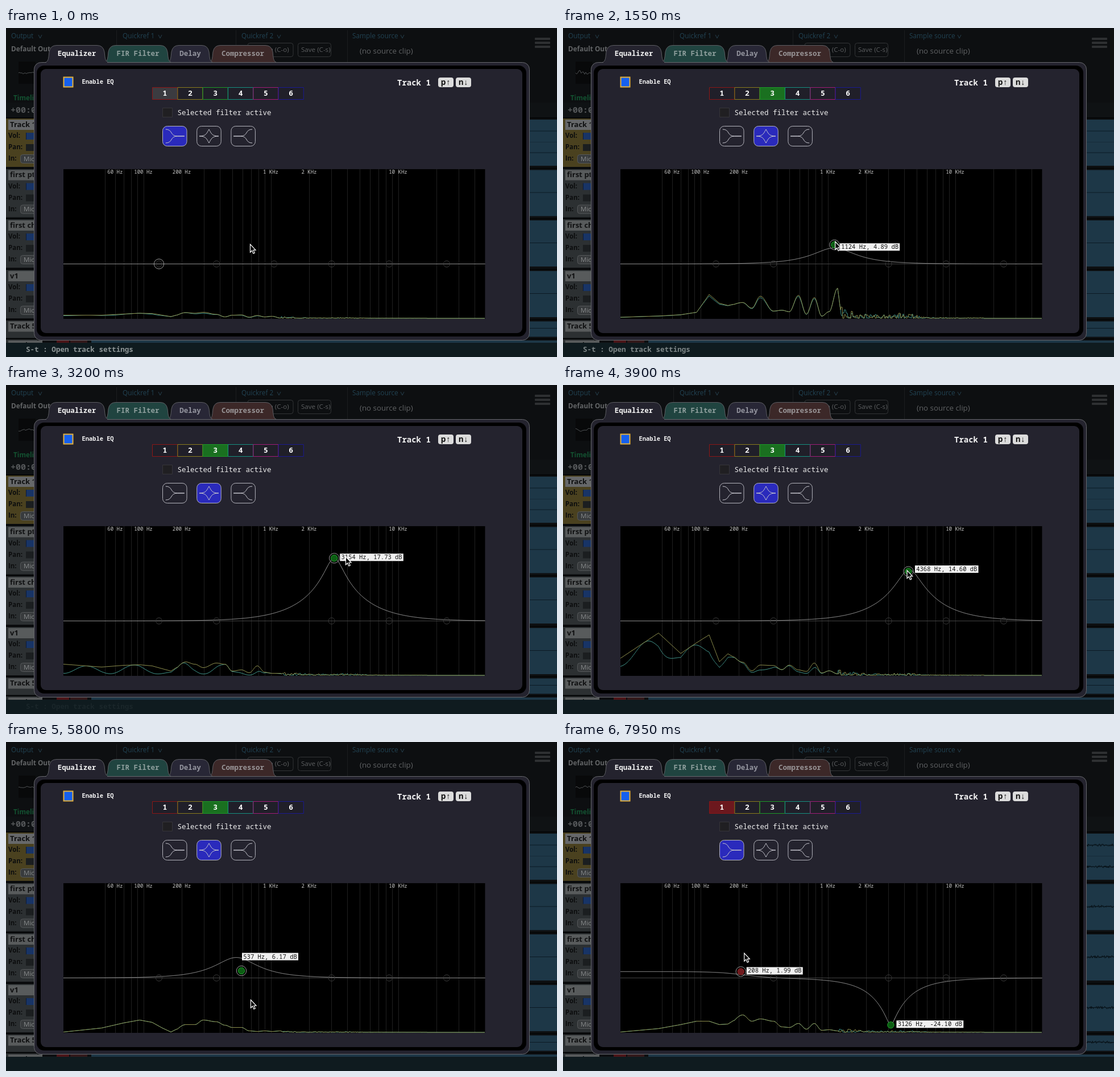
An HTML page with a canvas that plays this animation: 969x578 px, repeating every 8000 ms.

```html
<!DOCTYPE html>
<html lang="en">
<head>
<meta charset="utf-8">
<title>Equalizer</title>
<style>
html, body { margin: 0; width: 100%; height: 100%; overflow: hidden; background: #0c0e10; }
canvas { display: block; }
</style>
</head>
<body>
<canvas id="stage" width="969" height="578"></canvas>
<script>
const g = document.getElementById('stage').getContext('2d');
const LOOP = 8000, STEP = 50;
const MONO = '"Noto Sans Mono", "DejaVu Sans Mono", monospace';
const SANS = '"Open Sans", "Noto Sans", sans-serif';
const LEFT = 101, RIGHT = 842.5, TOP = 248, BASE = 510.5, ZERO = 414.5;
const COLORS = ['#8c1616', '#8a7a1c', '#1c9a28', '#159080', '#a01c78', '#1a1a92'];
const ACTIVE = { 0: '#6c181e', 2: '#1a7020' };

// Axis scales: log frequency, compressed amplitude
const fx = hz => 465.5 + 224 * Math.log10(hz / 1000);
const toHz = x => 1000 * 10 ** ((x - 465.5) / 224);
const ampY = a => BASE - 262 * Math.log(1 + 4 * a) / Math.log(81);
const toAmp = y => (Math.exp((BASE - y) / 262 * Math.log(81)) - 1) / 4;
const dbY = db => ampY(10 ** (db / 20));
const hash = n => { const s = Math.sin(n * 12.9898) * 43758.5453; return s - Math.floor(s); };
const clamp = (v, lo, hi) => Math.min(hi, Math.max(lo, v));

// Pointer path: time, Hz, dB
const path = [
  [0, 687, 5.94], [150, 700, 5.3], [600, 1050, 0.2], [700, 1063, 0], [800, 1063, 0],
  [850, 1075, -0.55], [950, 1080, -0.6], [1150, 1090, -0.9], [1500, 1130, 5.8],
  [1900, 1205, 12.9], [2150, 1233, 14.24], [2250, 1233, 14.24], [2500, 1370, 15],
  [2850, 2250, 16.9], [3100, 3154, 17.73], [3150, 3154, 17.73], [3200, 3864, 18.1],
  [3500, 4800, 17], [3850, 4300, 14.2], [4250, 3400, 16.4], [4550, 3154, 15.72],
  [4600, 2810, 15.35], [4650, 2195, 15.2], [4900, 1150, 13], [5200, 640, 11.4],
  [5500, 505, 9.8], [5700, 537, 6.17], [5750, 589, 2.23], [5800, 694, -7.84],
  [6050, 1400, -15], [6450, 2900, -22.5], [6800, 3126, -24.1], [6950, 3126, -24.1],
  [7400, 150, -1], [7500, 132.7, 0], [7600, 132.7, 0], [7850, 208, 1.99],
  [7900, 208, 1.99], [7950, 220, 7.4], [8000, 222, 7.6]
].map(([t, hz, db]) => [t, fx(hz), dbY(db)]);

function pointer(t) {
  let i = 1;
  while (i < path.length - 1 && path[i][0] < t) i++;
  const [t0, x0, y0] = path[i - 1], [t1, x1, y1] = path[i];
  const u = clamp((t - t0) / (t1 - t0), 0, 1);
  return { x: x0 + (x1 - x0) * u, y: y0 + (y1 - y0) * u };
}

// Spectrum heights at the knots, then noise level of the treble
const knots = [101, 168, 207, 235, 257, 275, 290, 316, 332, 347, 370, 385, 398, 414, 428, 442, 455, 468, 483];
const poses = [
  { t: 0, n: 3, d: .08, h: [6, 6, 8, 9.5, 9, 6, 3.5, 10.5, 9.5, 11, 7.5, 3, 6, 6.5, 2.5, 5.5, 3, 4, 1] },
  { t: 950, n: 6, d: .04, h: [1, 1.5, 4, 9, 11.5, 11.5, 8, 3.5, 10, 15, 11, 24, 10, 27, 5, 15, 4, 8, 8] },
  { t: 2250, n: 42, d: .03, h: [8, 6, 9, 28, 51, 59, 51, 39, 54, 60, 10, 29, 8, 57, 20, 38, 8, 20, 74] },
  { t: 3200, n: 8, d: .4, h: [20, 15, 18, 19, 17, 12, 8, 24, 20, 14, 22, 20, 8, 10, 5, 17, 6, 4, 4] },
  { t: 4650, n: 12, d: .06, h: [65, 91, 100, 101, 92, 78, 55, 18, 8, 12, 20, 6, 18, 22, 9, 17, 11, 9, 2] },
  { t: 5800, n: 3, d: 0, h: [1, 8, 17, 22, 18, 8, 1, 14, 14, 22, 19, 13, 9, 9, 3, 2, 3, 2, 3] },
  { t: 7950, n: 9, d: 0, h: [1, 7, 14, 20, 20, 14, 15, 31, 20, 24, 20, 10, 9, 16, 6, 16, 4, 5, 3] }
];

function spectrumAt(t) {
  let i = 1;
  while (i < poses.length - 1 && poses[i].t < t) i++;
  const a = poses[i - 1], b = poses[i];
  const u = clamp((t - a.t) / (b.t - a.t), 0, 1), wob = Math.sin(Math.PI * u);
  const mix = (p, q) => p + (q - p) * u;
  return {
    n: mix(a.n, b.n), d: mix(a.d, b.d),
    h: a.h.map((v, k) => mix(v, b.h[k]) * (1 + .45 * wob * Math.sin(t / 90 + k * 2.3)))
  };
}

function text(s, x, y, font, color, align = 'left') {
  g.font = font; g.fillStyle = color;
  g.textAlign = align; g.textBaseline = 'middle';
  g.fillText(s, x, y);
}
const mono = (s, x, y, size, color, weight = '', align) =>
  text(s, x, y, `${weight} ${size}px ${MONO}`, color, align);
const sans = (s, x, y, size, color, weight = '') =>
  text(s, x, y, `${weight} ${size}px ${SANS}`, color);

function rect(x, y, w, h, fill) { g.fillStyle = fill; g.fillRect(x, y, w, h); }

function box(x, y, w, h, r, fill, stroke, lw = 1) {
  g.beginPath(); g.roundRect(x, y, w, h, r);
  if (fill) { g.fillStyle = fill; g.fill(); }
  if (stroke) { g.strokeStyle = stroke; g.lineWidth = lw; g.stroke(); }
}

function ring(x, y, r, stroke, fill) {
  g.beginPath(); g.arc(x, y, r, 0, 7);
  if (fill) { g.fillStyle = fill; g.fill(); }
  g.strokeStyle = stroke; g.lineWidth = 1; g.stroke();
}

function line(pts, color, lw = 1) {
  g.beginPath();
  pts.forEach(([x, y]) => g.lineTo(x, y));
  g.strokeStyle = color; g.lineWidth = lw; g.stroke();
}

function caret(x, y) { line([[x - 3, y - 3], [x, y + 3], [x + 3, y - 3]], '#25404e'); }

function backdrop(t) {
  rect(0, 0, 969, 578, '#0d0f11');
  rect(0, 131, 969, 26, '#0f1214');
  [[9, 'Output', 60], [205, 'Quickref 1', 271], [414, 'Quickref 2', 480], [609, 'Sample source', 697]]
    .forEach(([x, s, c]) => { sans(s, x, 15, 11.8, '#214252'); caret(c, 15); });
  [194.5, 404.5, 600.5].forEach(x => line([[x, 4], [x, 130]], '#1b1d1f'));
  sans('Default Out:', 9, 38, 11.8, '#626466', 'bold');
  sans('(no source clip)', 622, 42, 13.3, '#606264');
  [[425, 80, 'Open (C-o)', 440], [513.5, 58, 'Save (C-s)', 519]].forEach(([x, w, s, tx]) => {
    box(x, 26.5, w, 24, 4, null, '#333537');
    sans(s, tx, 39, 11.6, '#5c5e60');
  });
  for (const y of [17, 24, 31]) box(930, y, 27, 4, 1, '#2e3032');

  rect(22, 59, 30, 39, '#08090a');
  const wave = [];
  const amp = 1 + Math.min(4, spectrumAt(t).n / 7);
  for (let x = 22; x < 52; x += 2) wave.push([x, 79 + amp * (hash(x + t) - .5) * 1.4 + amp * Math.sin(x / 4 + t / 70) * .5]);
  line(wave, '#4d5052');
  sans('Timeline', 13, 124, 11.8, '#135231', 'bold');
  mono('+00:00:00', 8, 145, 15, '#55585a', 'bold');

  ['Track 1', 'first pt', 'first ch', 'v1', 'Track 5', 'Track 6'].forEach((name, i) => {
    const y = [157, 245.5, 334, 423, 511.5, 545][i], h = [85, 85, 85, 85, 31, 12][i];
    rect(0, y + 2, 55, h, i ? '#2c3032' : '#4a411f');
    rect(0, y, 969, 2, '#050607');
    rect(4, y + 4, 60, 18, i ? '#585b5c' : '#66686a');
    sans(name, 7, y + 13.5, 13, '#101112', 'bold');
    if (i < 4) {
      ['Vol:', 'Pan:', 'In:'].forEach((s, k) => sans(s, 4, y + 33 + 20 * k, 11.5, '#0c0d0e', 'bold'));
      rect(35, y + 27, 20, 12, '#183466');
      rect(35, y + 47, 20, 12, '#1b1e20');
      line([[35.5, y + 27], [35.5, y + 39]], '#0c1b38');
      box(25.5, y + 65.5, 40, 15, 4, '#383b3d', '#55585a');
      sans('Mic', 31, y + 73.5, 11.5, '#86898a');
    }
    rect(150, y + 4, 819, h - 4, '#1d3747');
    const mids = i === 0 ? [181, 219] : i < 4 ? [y + 43.5] : i === 4 ? [y + 16] : [];
    mids.forEach(m => {
      line([[920, m], [969, m]], '#0b1a24');
      if (t < 6000) return;
      const pts = [];
      for (let x = Math.max(921, 969 - (t - 6000) * .03); x < 969; x++) pts.push([x, m + (hash(x * 3 + m) - .5) * 5]);
      line(pts, '#081218');
    });
    if (i === 0) line([[920, 200.5], [969, 200.5]], '#162c3a');
  });
  rect(89, 549, 22, 4, '#4c1518');
  rect(113, 549, 30, 4, '#33191b');

  rect(0, 553, 969, 25, '#0f1b1f');
  g.globalAlpha = clamp((3400 - t) / 2100, 0, 1);
  mono('S-t : Open track settings', 35, 565.5, 12.6, '#8d9596', 'bold');
  g.globalAlpha = 1;
}

function tab(x1, x2, label, fill, color, front) {
  g.beginPath();
  g.moveTo(x1 - 3, 60);
  g.quadraticCurveTo(x1 + 1, 59, x1 + 2, 51);
  g.lineTo(x1 + 3, 42);
  g.quadraticCurveTo(x1 + 5, 30.5, x1 + 16, 30.5);
  g.lineTo(x2 - 16, 30.5);
  g.quadraticCurveTo(x2 - 5, 30.5, x2 - 3, 42);
  g.lineTo(x2 - 2, 51);
  g.quadraticCurveTo(x2 - 1, 59, x2 + 3, 60);
  g.fillStyle = fill; g.fill();
  g.strokeStyle = '#5c5d62'; g.lineWidth = 1; g.stroke();
  if (front) rect(x1 - 2, 59, x2 - x1 + 4, 3, fill);
  mono(label, (x1 + x2) / 2, 45, 12.5, color, 'bold', 'center');
}

function typeIcon(kind, x) {
  g.strokeStyle = '#c4c4cc'; g.lineWidth = 1;
  const y = 190;
  for (const s of [-1, 1]) {
    g.beginPath();
    if (kind === 1) {
      g.moveTo(x - 17, y);
      g.bezierCurveTo(x - 5, y, x - 4, y + s * 5, x, y + s * 12);
      g.bezierCurveTo(x + 4, y + s * 5, x + 5, y, x + 17, y);
    } else {
      const d = kind ? -1 : 1;
      g.moveTo(x - d * 16, y + s * 12);
      g.bezierCurveTo(x - d * 3, y + s * 12, x - d * 9, y, x + d * 5, y);
      g.lineTo(x + d * 17, y);
    }
    g.stroke();
  }
}

function dialog(sel, active) {
  tab(361, 472, 'Compressor', '#3c2828', '#989496');
  tab(288, 360, 'Delay', '#282736', '#9596a0');
  tab(177, 287, 'FIR Filter', '#204440', '#8fa09e');
  box(49.5, 60.5, 871, 488, 12, '#24232e', '#66676c');
  box(54, 66, 861, 476, 13, '#000');
  box(61, 72, 847, 464, 9, '#24232e');
  tab(73, 176, 'Equalizer', '#24232e', '#f4f4f4', true);

  box(101.5, 86.5, 16, 17, 0, '#1560ee', '#e2b03c', 2);
  mono('Enable EQ', 133.5, 95.5, 10.4, '#f4f4f4', 'bold');
  mono('Track 1', 688, 97.5, 14, '#f4f4f4', 'bold');
  [[760, 'p↑'], [791, 'n↓']].forEach(([x, s]) => {
    box(x, 87, 27, 17, 4, '#dcdcdc');
    mono(s, x + 13.5, 96, 14, '#111', 'bold', 'center');
  });

  COLORS.forEach((c, i) => {
    const x = 257.5 + i * 44.35;
    const fill = i !== sel ? '#201f29' : active ? ACTIVE[i] : '#3b3b40';
    box(x, 104.5, 44, 21, 0, fill, c);
    mono(i + 1, x + 22, 115, 13, '#fff', 'bold', 'center');
  });
  box(275.5, 140.5, 17, 16, 0, '#201f22', '#36353a');
  mono('Selected filter active', 301.5, 149, 12.5, '#ececec');
  const type = sel === 2 ? 1 : 0;
  for (let k = 0; k < 3; k++) {
    const x = 275.5 + 60.2 * k;
    box(x, 172.5, 42.5, 35, 8, k === type ? '#2a2abc' : null, '#b4b4bc');
    typeIcon(k, x + 21.25);
  }
}

function spectrum(t) {
  const s = spectrumAt(t), tick = Math.round(t / STEP);
  const trace = (color, tint) => {
    const pts = [];
    let j = 1;
    for (let x = LEFT; x <= RIGHT; x++) {
      let h;
      if (x <= 483) {
        while (knots[j] < x) j++;
        let u = (x - knots[j - 1]) / (knots[j] - knots[j - 1]);
        if (x > 300) u = (1 - Math.cos(Math.PI * u)) / 2;
        h = s.h[j - 1] + (s.h[j] - s.h[j - 1]) * u;
        h *= 1 - tint * s.d * (1 + Math.sin(x / 13));
      } else {
        const r = hash(Math.floor(x / (x < 560 ? 3 : 2)) * 7.1 + tick * 3.7 + tint);
        const bump = .3 * Math.exp(-(((x - 600) / 28) ** 2));
        h = x > 740 ? .4 : .6 + s.n * r * r * (Math.exp((483 - x) / 45) + bump + .04);
        if (x < 490) h = Math.max(h, s.h[18] * (490 - x) / 7);
      }
      pts.push([x, BASE - Math.max(.4, h)]);
    }
    line(pts, color);
  };
  trace('#3f8f86', 1);
  trace('#8b8c4c', 0);
}

function tag(p) {
  const hz = Math.round(toHz(p.x)), db = (20 * Math.log10(Math.max(.001, toAmp(p.y)))).toFixed(2);
  const s = `${hz} Hz, ${db} dB`;
  g.font = `10.5px ${MONO}`;
  box(p.x + 10, p.y - 8, g.measureText(s).width + 4.5, 13, 0, '#f0f0f0');
  mono(s, p.x + 12.3, p.y - 1, 10.5, '#111');
}

function graph(t, sel, on1, on3) {
  rect(LEFT, TOP, RIGHT - LEFT, 263, '#000');
  for (const dec of [10, 100, 1000, 10000])
    for (let m = 1; m < 10; m++) {
      const x = Math.round(fx(dec * m)) + .5;
      if (dec * m >= 50 && x < RIGHT) line([[x, TOP], [x, 511]], '#202020');
    }
  [[60, '60 Hz'], [100, '100 Hz'], [200, '200 Hz'], [1000, '1 KHz'], [2000, '2 KHz'], [10000, '10 KHz']]
    .forEach(([hz, s]) => mono(s, fx(hz), 253, 9, '#c8c8c8', '', 'center'));
  line([[LEFT, ZERO], [RIGHT, ZERO]], '#424242');
  spectrum(t);

  // The knob trails the pointer; curve and tag trail the knob
  const low = lag => pointer(clamp(t - lag, 7600, LOOP));
  const mid = lag => pointer(clamp(t - lag, 800, 6950));
  const p1 = low(100), p3 = mid(100);
  const f1 = toHz(p1.x), g1 = toAmp(p1.y), f3 = toHz(p3.x), g3 = toAmp(p3.y);
  const band = (1.35 / (1 + .45 * g3)) ** 2;
  const pts = [];
  for (let x = LEFT; x <= RIGHT; x += .5) {
    const hz = toHz(x);
    let a = 1;
    if (on3) {
      const w = (hz / f3) ** 2, k = (1 - w) ** 2;
      a *= Math.sqrt((k + g3 * g3 * w * band) / (k + w * band));
    }
    if (on1) {
      const w = (hz / f1) ** 4;
      a *= Math.sqrt((g1 * g1 + w) / (1 + w));
    }
    pts.push([x, Math.abs(a - 1) < .001 ? ZERO : ampY(a)]);
  }
  line(pts, '#a4a4a4');

  for (let i = 0; i < 6; i++) {
    let p = { x: 269 + 101.2 * i, y: ZERO }, on = false;
    if (i === 0 && t >= 7600) { p = low(50); on = on1; }
    if (i === 2 && t >= 750) { p = mid(50); on = on3; }
    if (i === sel) ring(p.x, p.y, 8.7, '#9a9a9a');
    if (on) ring(p.x, p.y, 5.7, i ? '#20a52c' : '#8c2020', i ? '#0d5d14' : '#701a1e');
    else ring(p.x, p.y, 5.6, '#3a3a3a');
  }
  if (t >= 850) tag(p3);
  if (t >= 7650) tag(p1);
}

function cursor({ x, y }) {
  g.beginPath();
  [[0, 0], [0, 14], [3.2, 11], [5.4, 16.2], [7.8, 15.2], [5.6, 10.2], [9.6, 10.2]]
    .forEach(([dx, dy]) => g.lineTo(x + dx + .5, y + dy));
  g.closePath();
  g.fillStyle = '#000'; g.fill();
  g.strokeStyle = '#fff'; g.lineWidth = 1.2; g.stroke();
}

function draw(now) {
  const t = Math.floor((now % LOOP) / STEP) * STEP;
  const sel = t >= 750 && t < 7550 ? 2 : 0;
  const on3 = t >= 1000, on1 = t >= 7650;
  g.clearRect(0, 0, 969, 578);
  backdrop(t);
  dialog(sel, sel === 2 ? on3 : on1);
  graph(t, sel, on1, on3);
  cursor(pointer(t));
}

let start = null;
function tick(now) {
  if (start === null) start = now;
  draw(now - start);
  requestAnimationFrame(tick);
}
draw(0);
requestAnimationFrame(tick);
</script>
</body>
</html>
```
